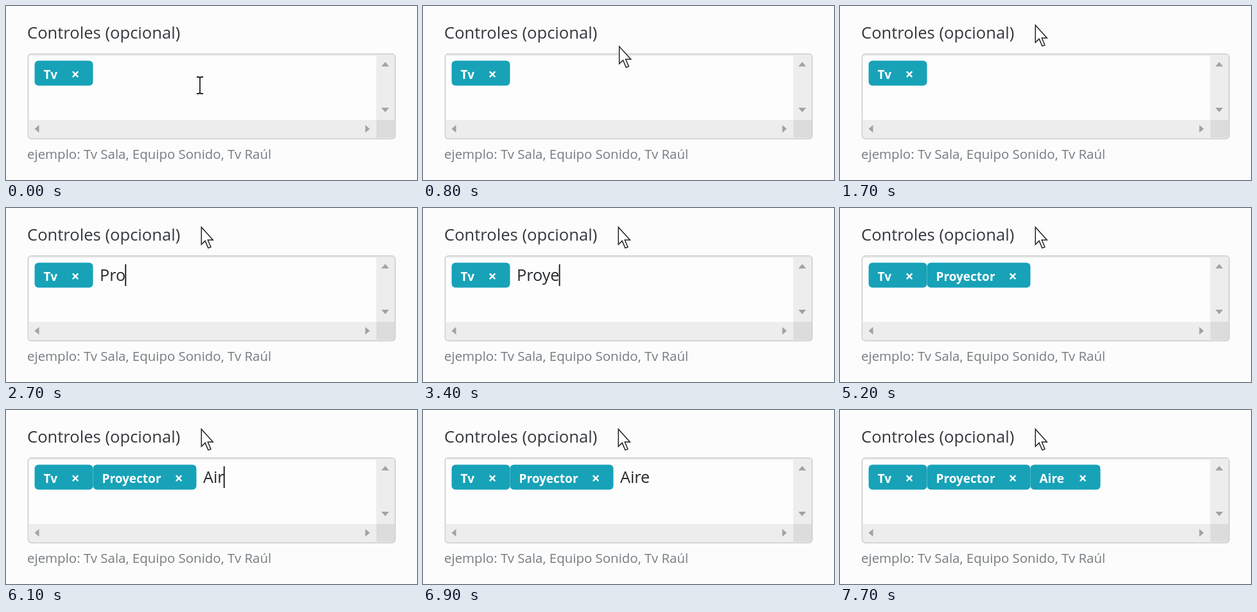
Recreate the animation shown at these times as an HTML page. Size 640x272 px, loop 8000 ms.

```html
<!DOCTYPE html>
<html lang="es">
<head>
<meta charset="utf-8">
<title>Controles</title>
<style>
  html, body { margin: 0; width: 100%; height: 100%; overflow: hidden; background: #fcfcfc; }
  svg { display: block; width: 640px; height: 272px; }
  text { font-family: "Open Sans", "Noto Sans", sans-serif; white-space: pre; }
  .label { font-size: 25.6px; fill: #34383c; }
  .hint { font-size: 20.45px; fill: #757c81; }
  .typed { font-size: 25.2px; fill: #25282b; }
  .tag rect { fill: #17a2b8; }
  .tag text { font-size: 19px; font-weight: 700; fill: #fff; }
  .tag .close { font-size: 23px; text-anchor: middle; }
</style>
</head>
<body>
<svg viewBox="0 0 640 272">
  <text class="label" x="33" y="50.5">Controles (opcional)</text>

  <rect x="34.5" y="74.8" width="571.5" height="132.7" rx="5" fill="#fdfdfd" stroke="#cfd1d3" stroke-width="1.8"/>
  <path d="M37 76.6H604" stroke="#e6e7e8" stroke-width="1.6"/>
  <path d="M576.5 77H605V178H576.5ZM36 178H576.5V206H36Z" fill="#ededed"/>
  <path d="M576.5 178H605V206H576.5Z" fill="#dcdcdc"/>
  <path d="M584.5 94.5l6-7 6 7ZM584.5 159l6 7 6-7ZM51.5 186l-7 6 7 6ZM559.5 186l7 6-7 6Z" fill="#a2a2a2"/>

  <g id="tags"></g>
  <text id="typed" class="typed" y="114"></text>
  <rect id="caret" y="88" width="1.8" height="34" fill="#111"/>

  <text class="hint" x="33" y="239">ejemplo: Tv Sala, Equipo Sonido, Tv Raúl</text>

  <path id="beam" d="M-5-13h3.5l1.5 1.5 1.5-1.5h3.5M0-11.5V11.5M-5 13h3.5l1.5-1.5 1.5 1.5h3.5" fill="none" stroke="#222" stroke-width="1.8"/>
  <path id="arrow" d="M0 0V27L5.8 21.4 10.6 32.6 14.6 31 10 20H18Z" fill="#fff" stroke="#222" stroke-width="1.5"/>
</svg>
<script>
const LOOP = 8000, TICK = 100, BLINK = 530;
const byId = id => document.getElementById(id);
const typed = byId("typed"), caret = byId("caret"), beam = byId("beam"), arrow = byId("arrow");

const tags = [
  { name: "Tv", left: 44.6, right: 135.5 },
  { name: "Proyector", left: 135.5, right: 296.5 },
  { name: "Aire", left: 296.5, right: 405.5 }
];
byId("tags").innerHTML = tags.map(({ name, left, right }) => `
  <g class="tag">
    <rect x="${left}" y="85.5" width="${right - left}" height="39" rx="6"/>
    <text x="${left + 14}" y="113.5">${name}</text>
    <text class="close" x="${right - 27.5}" y="115">×</text>
  </g>`).join("");
const tagNodes = document.querySelectorAll(".tag");

// Input states: each one restarts the caret blink.
const states = [{ at: 105, count: 1, text: "" }];
function type(word, count, times) {
  times.forEach((at, i) => states.push({ at, count, text: word.slice(0, i + 1) }));
}
type("Proyector", 1, [2490, 2590, 2690, 2890, 3290, 3590, 3690, 3790, 3860]);
states.push({ at: 4590, count: 2, text: "" });
type("Aire", 2, [5490, 5790, 6090, 6160]);
states.push({ at: 7090, count: 3, text: "" });

// Pointer path from inside the field up to beside the label: [ms, x, y].
const path = [[400, 302, 124], [600, 303, 106], [900, 307, 42], [1000, 307, 18], [1200, 304.3, 30]];
function pointerAt(t) {
  if (t <= path[0][0]) return path[0].slice(1);
  const i = path.findIndex(p => p[0] >= t);
  if (i < 0) return path[path.length - 1].slice(1);
  const [t0, x0, y0] = path[i - 1], [t1, x1, y1] = path[i];
  const k = (t - t0) / (t1 - t0);
  return [x0 + (x1 - x0) * k, y0 + (y1 - y0) * k];
}

const show = (node, on) => node.setAttribute("visibility", on ? "visible" : "hidden");

function draw(t) {
  const state = states.filter(s => s.at <= t).pop() || states[0];
  tagNodes.forEach((node, i) => show(node, i < state.count));

  const start = tags[state.count - 1].right + 10.5;
  typed.setAttribute("x", start);
  typed.textContent = state.text;
  const width = state.text ? typed.getComputedTextLength() : 0;
  caret.setAttribute("x", start - 0.8 + width);
  show(caret, t >= state.at && Math.floor((t - state.at) / BLINK) % 2 === 0);

  const [x, y] = pointerAt(t), inField = y > 75;
  show(beam, inField);
  show(arrow, !inField);
  for (const node of [beam, arrow]) node.setAttribute("transform", `translate(${x} ${y})`);
}

function frame(now) {
  draw(Math.floor(now % LOOP / TICK) * TICK);
  requestAnimationFrame(frame);
}
draw(0);
requestAnimationFrame(frame);
</script>
</body>
</html>
```
